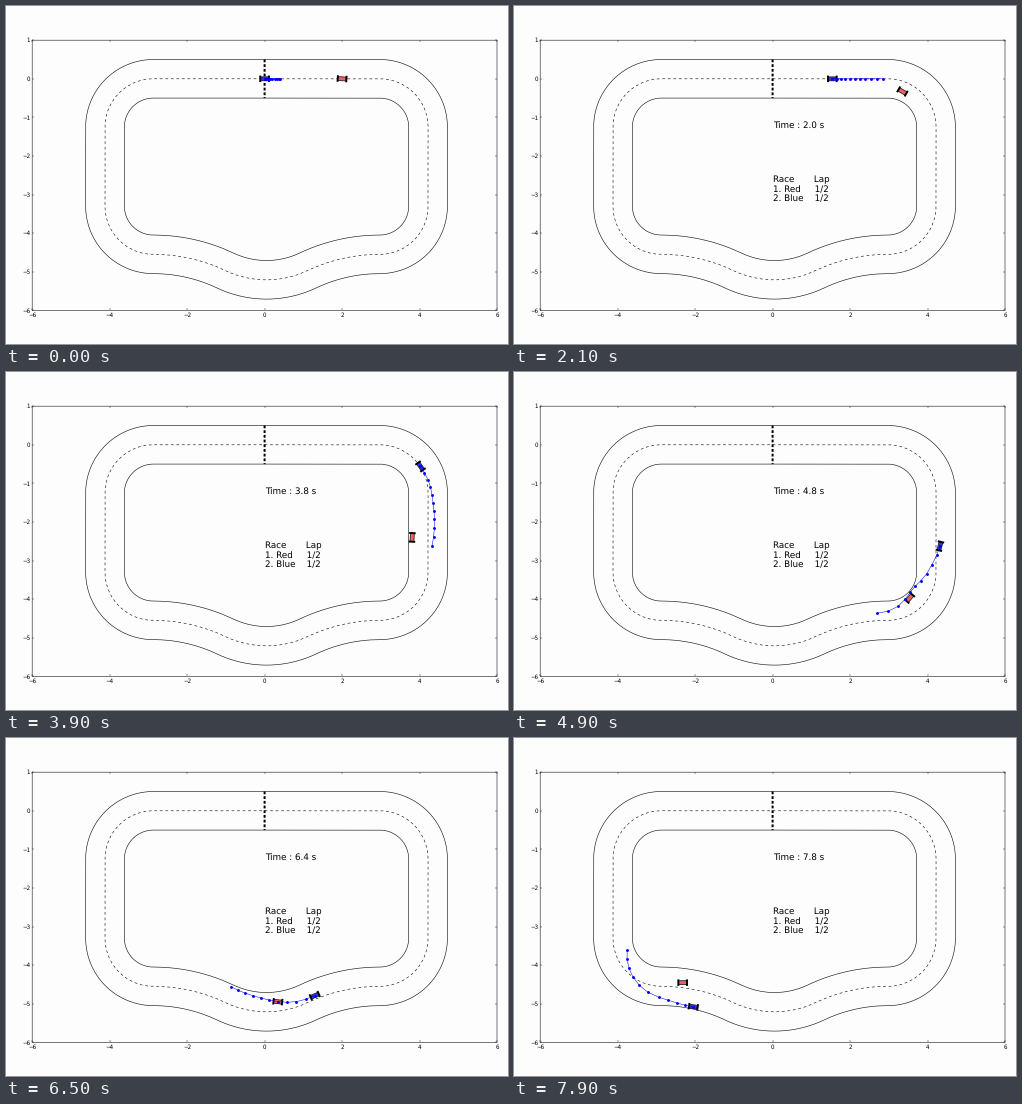
Recreate the animation shown at these times as a matplotlib script. Size 502 px wide and 338 px high, loop 8 s.

```python
import numpy as np
import matplotlib.pyplot as plt
from matplotlib.animation import FuncAnimation
from matplotlib.patches import Polygon

W, H, DPI = 502, 338, 64
PT = 72 / DPI                       # points per pixel
LEFT, RIGHT, TOP, BOTTOM = 26.2, 491, 34.2, 304.3
FRAMES, STEP, HORIZON = 80, 0.1, 10

plt.rcParams.update({"font.family": "DejaVu Sans", "text.hinting": "none",
                     "path.snap": False})


class Track:
    """Clockwise centre line built from (length, right-hand curvature) pieces."""

    def __init__(self, half=2.92, side=2.05, radius=1.25, dip=0.66):
        bend = 2 * np.arctan(dip / half)
        reach = half / np.sin(bend)
        hump, bowl = 0.635 * reach, 0.365 * reach
        corner = (radius * np.pi / 2, 1 / radius)
        swell = (hump * bend, -1 / hump)
        pieces = [(half + 0.05, 0), corner, (side, 0), corner, swell,
                  (2 * bowl * bend, 1 / bowl), swell,
                  corner, (side, 0), corner, (half - 0.05, 0)]
        n = 300
        ds = np.repeat([length / n for length, _ in pieces], n)
        turn = -ds * np.repeat([k for _, k in pieces], n)
        mid = np.cumsum(turn) - turn / 2
        self.s, self.x, self.y, self.h = (
            np.concatenate([[0], np.cumsum(v)])
            for v in (ds, ds * np.cos(mid), ds * np.sin(mid), turn))

    def at(self, s, d):
        """Point at distance s along the lap, d outward of the centre."""
        x, y, h = (np.interp(s, self.s, v) for v in (self.x, self.y, self.h))
        return np.stack([x - d * np.sin(h), y + d * np.cos(h)], axis=-1)


track = Track()


class Drive:
    """Smooth run through key points (time, distance, offset), from rest."""

    def __init__(self, *keys):
        keys = np.array(keys, float)
        self.t, self.v = keys[:, 0], keys[:, 1:]
        self.m = np.gradient(self.v, self.t, axis=0)
        self.m[0] = 0

    def state(self, t):
        t = np.clip(np.atleast_1d(t), self.t[0], self.t[-1])
        i = np.clip(np.searchsorted(self.t, t, "right") - 1, 0, len(self.t) - 2)
        h = (self.t[i + 1] - self.t[i])[:, None]
        u = (t - self.t[i])[:, None] / h
        v = ((1 + 2 * u) * (1 - u) ** 2 * self.v[i]
             + u * (1 - u) ** 2 * h * self.m[i]
             + u ** 2 * (3 - 2 * u) * self.v[i + 1]
             + u ** 2 * (u - 1) * h * self.m[i + 1])
        return v.T

    def pose(self, t):
        a, pos, b = track.at(*self.state(t + np.array([-0.05, 0, 0.05])))
        return pos, np.arctan2(*(b - a)[::-1])


blue_drive = Drive((0, 0, 0), (1.1, 0.71, 0), (2.8, 2.54, 0), (3.8, 4.21, 0.01),
                   (4.8, 6.31, 0.1), (5.4, 7.88, -0.47), (5.7, 8.92, -0.24),
                   (6.4, 10.63, -0.09), (7.0, 12.14, -0.14), (7.8, 14.06, 0.44),
                   (8.8, 16.52, -0.15))
red_drive = Drive((0, 2, 0), (1.1, 2.54, -0.07), (1.9, 3.35, -0.24),
                  (2.8, 4.45, -0.3), (4.8, 8.07, -0.37), (5.7, 10.09, -0.04),
                  (7.0, 12.91, -0.4), (7.8, 14.45, -0.13), (8.2, 15.2, -0.05))


def forecast(t):
    """Planned positions over the horizon."""
    u = np.linspace(0, 1, HORIZON + 1)
    s, d = blue_drive.state(t + u * HORIZON * STEP)
    s = s - 0.22 * np.exp(-(t / 0.4) ** 2) * u ** 2
    # plans to cut inside before being forced wide
    d = d - 0.77 * np.exp(-((t - 6.8) / 0.8) ** 2) * u ** 2
    return track.at(s, d)


class Car:
    # boxes as (centre, half length, half width)
    BODY = (0, 0.108, 0.05)
    AXLES = ((-0.112, 0.025, 0.084), (0.112, 0.025, 0.084))

    def __init__(self, ax, drive, color):
        self.drive = drive
        self.parts = [(self.box(ax, color, 0.8), self.BODY)]
        self.parts += [(self.box(ax, "black", 0), axle) for axle in self.AXLES]

    @staticmethod
    def box(ax, color, edge):
        return ax.add_patch(Polygon(np.zeros((4, 2)), fc=color, ec="#202020",
                                    lw=edge * PT, zorder=4))

    def move(self, t):
        pos, a = self.drive.pose(t)
        rot = np.array([[np.cos(a), np.sin(a)], [-np.sin(a), np.cos(a)]])
        for patch, (c, hl, hw) in self.parts:
            box = np.array([(c - hl, -hw), (c + hl, -hw), (c + hl, hw), (c - hl, hw)])
            patch.set_xy(pos + box @ rot)


fig = plt.figure(figsize=(W / DPI, H / DPI), dpi=DPI, facecolor="#fdfdfd")
ax = fig.add_axes([LEFT / W, 1 - BOTTOM / H, (RIGHT - LEFT) / W, (BOTTOM - TOP) / H],
                  facecolor="#fdfdfd")
ax.set(xlim=(-6, 6), ylim=(-6, 1), xticks=range(-6, 7, 2), yticks=range(-6, 2))
ax.tick_params(direction="in", top=True, right=True, length=1.9 * PT,
               width=0.4 * PT, pad=1.9 * PT, labelsize=5.5 * PT)
for spine in ax.spines.values():
    spine.set(linewidth=0.6 * PT, edgecolor="#222222", snap=False)

for off in (-0.5, 0.5):
    ax.plot(*track.at(track.s, off).T, color="#111111", lw=0.6 * PT, snap=False,
            solid_capstyle="butt")
ax.plot(*track.at(track.s, 0).T, color="#111111", lw=0.6 * PT, snap=False,
        dashes=(4.6, 4.6))
ax.plot([0, 0], [0.5, -0.5], color="black", lw=2 * PT, dashes=(1.4, 0.95),
        snap=False)

plan, = ax.plot([], [], "o-", color="blue", lw=0.5 * PT, ms=2.9 * PT,
                mew=0, zorder=6)
blue_car = Car(ax, blue_drive, "#3030f0")
red_car = Car(ax, red_drive, "#f06060")


def label(y, text):
    return ax.text(0, y, text, size=8.7 * PT, va="baseline")


clock = label(-1.27, "")
board = [label(-2.68 - 0.248 * i, row) for i, row in enumerate(
    ("Race       Lap", "1. Red     1/2", "2. Blue    1/2"))]


def draw(n):
    t = max(n - 1, 0) * STEP
    blue_car.move(t)
    red_car.move(t)
    plan.set_data(*forecast(t).T)
    clock.set_text(f"Time : {t:.1f} s")
    for text in [clock] + board:
        text.set_visible(n > 0)
    return []


anim = FuncAnimation(fig, draw, frames=FRAMES, interval=100, repeat=True,
                     repeat_delay=0, init_func=lambda: draw(0), blit=False)
plt.show()
```
